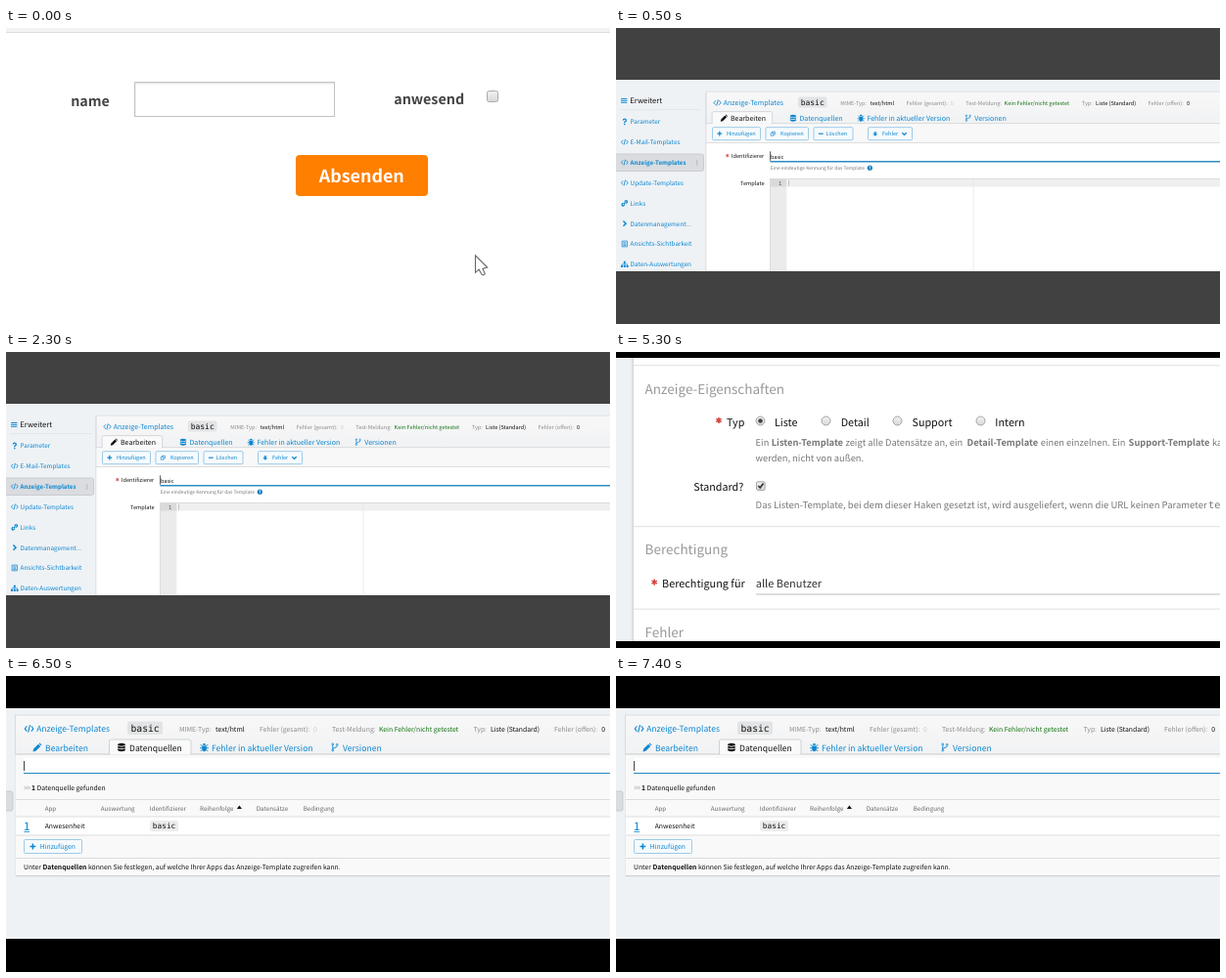
An HTML page that plays this animation: 617x303 px, repeating every 8000 ms.

```html
<!DOCTYPE html>
<html lang="de">
<head>
<meta charset="utf-8">
<title>Anzeige-Templates</title>
<style>
html, body { margin: 0; width: 100%; height: 100%; overflow: hidden; background: #fff; }
svg { display: block; width: 617px; height: 303px; }
text {
  font-family: "Noto Sans CJK SC", "Noto Sans CJK JP", "Noto Sans CJK KR", "Noto Sans CJK TC", "Noto Sans", sans-serif;
  text-rendering: geometricPrecision;
  white-space: pre;
}
text.mono { font-family: "DejaVu Sans Mono", monospace; }
</style>
</head>
<body>
<svg id="stage" viewBox="0 0 617 303" xmlns="http://www.w3.org/2000/svg">
  <defs>
    <linearGradient id="box" x2="0" y2="1"><stop stop-color="#f2f2f2"/><stop offset="1" stop-color="#d8d8d8"/></linearGradient>
    <linearGradient id="head" x2="0" y2="1"><stop stop-color="#f8f8f9"/><stop offset="1" stop-color="#f1f2f3"/></linearGradient>
    <linearGradient id="edge"><stop stop-color="#eff2f6"/><stop offset="1" stop-color="#dfe2e6"/></linearGradient>
  </defs>
</svg>
<script>
const BLUE = '#0b86d0', INK = '#111', GREY = '#8b8b8b', LINE = '#ddd', PAGE = '#eff2f5';
const EM = 0.895; // Latin letters in the CJK face run large

const rect = (x, y, w, h, fill, more = '') =>
  `<rect x="${x}" y="${y}" width="${w}" height="${h}" fill="${fill}" ${more}/>`;
const hline = (x, y, color = LINE, h = 1) => rect(x, y, 617 - x, h, color);
const text = (x, y, size, str, color = INK, weight = 400) =>
  `<text x="${x}" y="${y}" font-size="${(size * EM).toFixed(3)}" fill="${color}" font-weight="${weight}">${str}</text>`;
const bold = (x, y, size, str, color) => text(x, y, size, str, color, 700);
const mono = (x, y, size, str, color = INK) =>
  `<text class="mono" x="${x}" y="${y}" font-size="${size}" fill="${color}">${str}</text>`;
const stroke = (d, color, w = 1, more = '') =>
  `<path d="${d}" fill="none" stroke="${color}" stroke-width="${w}" ${more}/>`;
const fill = (d, color) => `<path d="${d}" fill="${color}"/>`;
const circle = (x, y, r, color, more = '') => `<circle cx="${x}" cy="${y}" r="${r}" fill="${color}" ${more}/>`;
const at = (x, y, s, body) => `<g transform="translate(${x} ${y}) scale(${s})">${body}</g>`;

// Icons sit in a 10 by 10 box
const icons = {
  code: c => stroke('M2.7 2.3L.6 5l2.1 2.7M7.3 2.3L9.4 5 7.3 7.7M5.9 1.2L4.1 8.8', c, 1.1),
  bars: c => stroke('M0 2h10M0 5h10M0 8h10', c, 1.5),
  pencil: c => fill('M0 10l.8-3.2L6.2 1.4l2.4 2.4L3.2 9.2zM6.9.8L7.7 0 10 2.3l-.8.8z', c),
  data: c => fill('M.8 1.5Q5-1 9.2 1.5v1.2Q5 4.5.8 2.7zM.8 3.7Q5 5.5 9.2 3.7v1.8Q5 7.3.8 5.5zM.8 6.5Q5 8.3 9.2 6.5v2Q5 11 .8 8.5z', c),
  bug: c => fill('M3 2.5a2 2 0 0 1 4 0zM2.5 3.2h5v3.5a2.5 3 0 0 1-5 0z', c) +
    stroke('M.8 1.8l2 2M9.2 1.8l-2 2M0 5.8h10M.8 9.5l2-2M9.2 9.5l-2-2', c, 1),
  branch: c => stroke('M2.5 2.5v5M7.5 3v.5Q7.5 5 5 5.4T2.5 7', c, 1) +
    [[2.5, 1.5], [2.5, 8.5], [7.5, 2]].map(p => circle(...p, 1, 'none', `stroke="${c}" stroke-width=".9"`)).join(''),
  query: c => stroke('M3 3.2Q3 1.4 5 1.4t2 1.8Q7 4.4 5.8 4.9T5 6.8', c, 1.7) + rect(4.1, 7.7, 1.8, 1.7, c),
  plus: c => stroke('M5 0v10M0 5h10', c, 2.5),
  minus: c => stroke('M0 5h10', c, 2.5),
  copy: c => stroke('M.7 3.2h5.5v6.1H.7zM3.6 2.9V.7h5.7v6.1H6.6', c, 1.4),
  link: c => stroke('M4 6l2-2M5 3l1-1a1.4 1.4 0 0 1 2.2 2L7 5.2M5 7L4 8a1.4 1.4 0 0 1-2.2-2L3 4.8', c, 1.7),
  chevron: c => stroke('M3.2 1.5L6.7 5 3.2 8.5', c, 1.9),
  form: c => stroke('M1.5 1.2h7v7.6h-7zM3 3.5h4M3 5.2h4M3 6.9h4', c, 1),
  tree: c => fill('M3.7.8h2.6v2.6H3.7zM0 6.6h2.6v2.6H0zM3.7 6.6h2.6v2.6H3.7zM7.4 6.6H10v2.6H7.4z', c) +
    stroke('M5 3v4M1.3 7V5h7.4v2', c, .9)
};
const icon = (name, x, y, size, color = BLUE) => at(x, y, size / 10, icons[name](color));
const star = (x, y, r) => stroke(`M0-1V1M-.87-.5L.87 .5M-.87 .5L.87-.5`, '#d3433c', .5,
  `transform="translate(${x} ${y}) scale(${r})"`);
const button = (x, y, w, h, s, mark, label, tx) =>
  rect(x, y, w, h, '#f6fafc', `rx="1" stroke="#92c6e6" stroke-width=".9"`) +
  icon(mark, x + 6 * s, y + h / 2 - 2.9 * s, 5.8 * s) +
  text(tx, y + h / 2 + 2.6 * s, 7.6 * s, label, BLUE);

// Title bar and tabs, shared by both template pages
function header(active) {
  const tabs = [
    ['Bearbeiten', 40, 'pencil', 27.5, 17, 75],
    ['Datenquellen', 126, 'data', 113.5, 105.5, 83.5],
    ['Fehler in aktueller Version', 210, 'bug', 198, 0, 0],
    ['Versionen', 344, 'branch', 331.5, 0, 0]
  ];
  const info = [
    [177, 'MIME-Typ:', GREY], [214, 'text/html', INK], [259, 'Fehler (gesamt):', GREY], [314, '0', '#ccc'],
    [333, 'Test-Meldung:', GREY], [381, 'Kein Fehler/nicht getestet', '#127212'],
    [477.5, 'Typ:', GREY], [495, 'Liste (Standard)', INK], [560, 'Fehler (offen):', GREY], [608.3, '0', INK]
  ];
  const [, , , , tx, tw] = tabs[active];
  return rect(9.5, 40, 680, 40, 'url(#head)', 'stroke="#d7d9dc" stroke-width=".9"') +
    icon('code', 18.7, 49, 9.8) + text(31.2, 57, 9.55, 'Anzeige-Templates', BLUE) +
    rect(124, 46.5, 36, 13.5, '#e3e4e5', 'rx="2.5"') + mono(127.5, 57, 9.7, 'basic') +
    info.map(([x, s, c]) => text(x, 57, 7.62, s, c)).join('') +
    rect(9.5, 79.5, 680, 1, '#d5d7d9') +
    stroke(`M${tx} 80.5V67q0-2 2-2h${tw - 4}q2 0 2 2v13.5`, '#cfd1d3', 1, 'style="fill:#fafafa"') +
    tabs.map(([s, x, i, ix], n) => {
      const c = n === active ? INK : BLUE;
      return icon(i, ix, 68.5, 9, c) + text(x, 77, 9.6, s, c);
    }).join('');
}

function form() {
  return rect(0, 0, 617, 303, '#fff') + rect(0, 0, 617, 4, '#f3f3f3') + hline(0, 4, '#dcdcdc') +
    bold(66.2, 80, 16, 'name', '#444') +
    rect(131.5, 55.5, 204, 35, '#fff', 'stroke="#c4c4c4"') +
    rect(132, 56, 203, 1, '#e6e6e6') + rect(132, 57, 203, 1, '#f5f5f5') + rect(132, 57, 1, 33, '#f1f1f1') +
    bold(396.2, 78, 16, 'anwesend', '#444') +
    rect(491.5, 64.5, 11, 11, 'url(#box)', 'rx="2" stroke="#aaa"') +
    rect(296, 130, 135, 42, '#ff7f00', 'rx="4"') +
    bold(319.8, 158, 20, 'Absenden', '#fff') +
    stroke('M479.5 232.8v17.6l3.6-3.2 3 5.2q1.6 1.2 3.2-.8l-2.4-5.2 4.8-1.4z', '#666', 1.1, 'style="fill:#fff"');
}

function editor() {
  const menu = [
    ['query', 'Parameter'], ['code', 'E-Mail-Templates'], ['code', 'Anzeige-Templates'], ['code', 'Update-Templates'],
    ['link', 'Links'], ['chevron', 'Datenmanagement...'], ['form', 'Ansichts-Sichtbarkeit'], ['tree', 'Daten-Auswertungen']
  ];
  const side = menu.map(([i, s], n) => {
    const y = 95.8 + n * 20.85;
    return icon(i, 5, y - 3.7, 7.6) +
      (n === 2 ? bold(14.6, y + 2.5, 6.9, s, BLUE) : text(14.6, y + 2.5, 7.1, s, BLUE));
  }).join('');
  const top = at(84.2, 32.3, .82, header(0));
  return rect(0, 0, 617, 303, PAGE) +
    rect(-3, 129, 92.5, 17.5, '#dadcdf', 'rx="2" stroke="#c3c6ca" stroke-width=".8"') +
    icon('bars', 5, 71.2, 6.4) + text(14.3, 77, 8.55, 'Erweitert', INK, 500) + rect(4, 83, 83, .8, '#e0e4e8') + side +
    [136, 138, 140].map(y => rect(82.3, y - .5, .9, .9, '#888')).join('') +
    rect(92, 98, 525, 155, '#fff') + top +
    rect(92, 98.2, 525, 19, '#f8f8f8') + hline(92, 117, '#dedede') + rect(91.5, 66, .8, 190, '#d5d8dc') +
    button(98.5, 101.7, 49, 13, .82, 'plus', 'Hinzufügen', 113) +
    button(153, 101.7, 43.5, 13, .82, 'copy', 'Kopieren', 168) +
    button(202, 101.7, 40, 13, .82, 'minus', 'Löschen', 214.5) +
    button(257.5, 101.7, 45, 13, .82, 'bug', 'Fehler', 272) +
    stroke('M292.3 107.2l2.2 2.2 2.2-2.2', BLUE, 1.3) +
    star(113.8, 130.6, 1.7) + text(117.8, 133.3, 6.3, 'Identifizierer') +
    text(157.9, 133.5, 6.3, 'basic') + rect(157.3, 126.3, .7, 9.5, '#222') +
    hline(157.5, 136, '#2b8cc4', 1.5) +
    text(157.7, 145.2, 5.48, 'Eine eindeutige Kennung für das Template', '#777') +
    circle(259.3, 143.2, 2.6, '#1a7fbd') + bold(258, 145.1, 5.2, '?', '#fff') +
    text(127, 160.8, 6.3, 'Template') +
    rect(157.5, 154.5, 470, 110, '#fff', 'stroke="#d4d4d4" stroke-width=".8"') +
    rect(158, 155, 16.3, 110, '#ebebeb') + rect(158, 155, 16.3, 7.5, '#dadada') + rect(174.3, 155, 443, 7.5, '#efefef') +
    mono(166, 160.9, 5.4, '1', '#555') + rect(176, 156, .8, 6, '#bbb') + rect(364.7, 155, .7, 100, '#e4e4e4') +
    rect(0, 0, 617, 53, '#414141') + rect(0, 249, 617, 54, '#414141');
}

function settings() {
  const hint = '#777';
  const radios = [['Liste', 147.5, 162], ['Detail', 214.5, 229.7], ['Support', 287.5, 302.5], ['Intern', 372.5, 387.3]];
  const help = [
    [142.6, 'Ein'], [158.7, 'Listen-Template', 700], [234.4, 'zeigt alle Datensätze an, ein'],
    [358.6, 'Detail-Template', 700], [433.8, 'einen einzelnen. Ein'], [523.6, 'Support-Template', 700], [609, 'kann']
  ];
  const rule = y => hline(18, y, '#e0e0e0');
  return rect(0, 0, 617, 303, '#fff') + rect(0, 0, 14, 303, PAGE) + rect(14, 0, 3, 303, 'url(#edge)') +
    rect(17, 0, 1, 303, '#d4d7db') + rule(13.3) +
    text(29.6, 43, 15.1, 'Anzeige-Eigenschaften', '#999') +
    star(105, 70, 3.1) + text(113, 75.7, 12, 'Typ') +
    radios.map(([s, x, tx], n) => circle(x, 70.5, 4.5, 'url(#box)', 'stroke="#9b9b9b" stroke-width=".9"') +
      (n ? '' : circle(x, 70.5, 2.3, '#444')) + text(tx, 75.7, 12, s)).join('') +
    help.map(([x, s, weight]) => text(x, 96.2, 10.4, s, hint, weight)).join('') +
    text(142.6, 112.2, 10.45, 'werden, nicht von außen.', hint) +
    text(79.3, 142, 12, 'Standard?') +
    rect(143.5, 132.8, 8.6, 8.6, 'url(#box)', 'rx="1.3" stroke="#9b9b9b" stroke-width=".9"') +
    stroke('M145.3 137l1.9 2 3.3-4.6', '#333', 1.7) +
    text(142.6, 160, 10.64, 'Das Listen-Template, bei dem dieser Haken gesetzt ist, wird ausgeliefert, wenn die URL keinen Parameter', hint) +
    mono(605, 160, 10.2, 'template', hint) +
    rule(178.2) + text(29.6, 207, 15.1, 'Berechtigung', '#999') +
    star(39.2, 235.6, 3.1) + text(47, 241, 12.15, 'Berechtigung für') +
    text(142.8, 241, 12.3, 'alle Benutzer', '#333') + hline(143, 247.5, '#bbb') +
    rule(262.6) + text(29.6, 292, 15.1, 'Fehler', '#999') +
    rect(0, 0, 617, 6, '#000') + rect(0, 296, 617, 7, '#000');
}

function sources() {
  const heads = [['App', 39.7], ['Auswertung', 96.7], ['Identifizierer', 146.7], ['Reihenfolge', 198],
    ['Datensätze', 255.8], ['Bedingung', 303.7]];
  return rect(0, 0, 617, 303, PAGE) +
    rect(-4, 118, 11, 20, '#dadcdf', 'rx="2" stroke="#c3c6ca" stroke-width=".8"') +
    rect(9.5, 41, 620, 164.5, '#dfe2e5') + rect(10, 80, 617, 124, '#f9f9f9') + header(1) +
    rect(18, 84, 600, 15, '#fff') + hline(18, 99, '#2b8cc4', 1.1) + rect(18.2, 87, .9, 10, '#222') +
    stroke('M18.8 112.8l1.4 1.6-1.4 1.6M20.9 112.8l1.4 1.6-1.4 1.6M23 112.8l1.4 1.6-1.4 1.6', '#999', .7) +
    bold(26, 117, 7.6, '1', INK) + text(31.6, 117, 7.6, 'Datenquelle gefunden') +
    hline(10, 126) + heads.map(([s, x]) => text(x, 137.6, 7, s, '#666')).join('') +
    fill('M235.8 136l2.6-3.4 2.6 3.4z', INK) +
    rect(10, 144, 607, 19, '#fff') + hline(10, 143.5) +
    text(18, 158, 13, '1', BLUE) + rect(18.3, 159, 5.8, .8, BLUE) +
    text(39.7, 156, 7.6, 'Anwesenheit') +
    rect(147, 148, 29, 11, '#ececec', 'rx="2"') + mono(149.8, 156, 7.8, 'basic') +
    hline(10, 162.5) + button(18.5, 167.5, 59, 14, 1, 'plus', 'Hinzufügen', 34.7) +
    hline(10, 186) +
    text(18, 198, 7.6, 'Unter <tspan font-weight="700">Datenquellen</tspan> können Sie festlegen, auf welche Ihrer Apps das Anzeige-Template zugreifen kann.') +
    hline(10, 204, '#d0d3d6') +
    rect(0, 0, 617, 33, '#000') + rect(0, 269, 617, 34, '#000');
}

const LOOP = 8000;
const scenes = [[0, form], [500, editor], [3500, settings], [6500, sources]];
const stage = document.getElementById('stage');
stage.insertAdjacentHTML('beforeend', scenes.map(([, draw]) => `<g display="none">${draw()}</g>`).join(''));
const groups = [...stage.children].slice(1);

function show(time) {
  const t = time % LOOP;
  const now = scenes.filter(([start]) => t >= start).length - 1;
  groups.forEach((g, n) => g.setAttribute('display', n === now ? 'inline' : 'none'));
}

const begin = performance.now();
function tick() {
  show(performance.now() - begin);
  requestAnimationFrame(tick);
}
tick();
</script>
</body>
</html>
```
